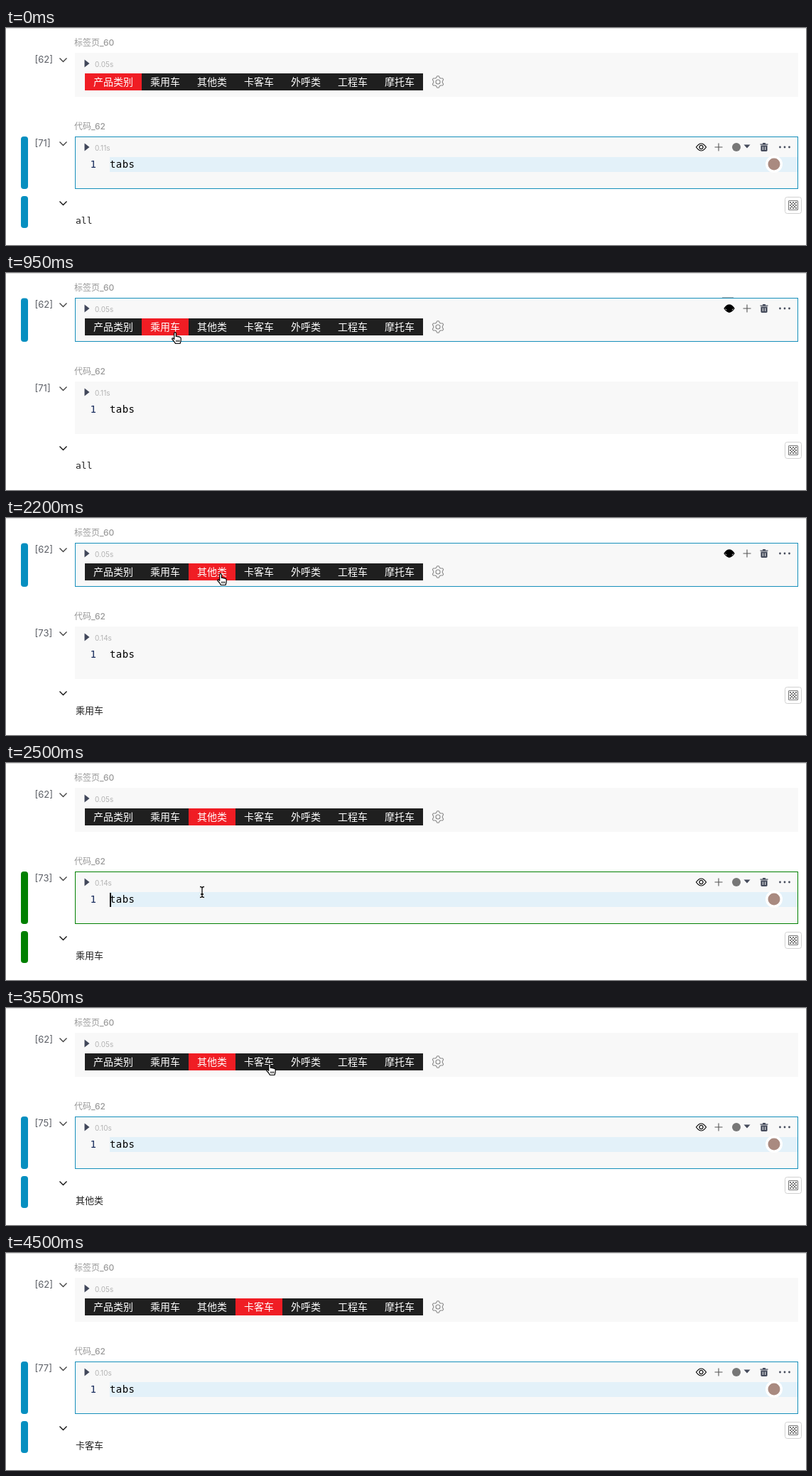
Animation, 1126 px wide and 306 px high, one loop 4980 ms. Source, as an HTML page:

```html
<!DOCTYPE html>
<html lang="zh-CN">
<head>
<meta charset="utf-8">
<title>Notebook tabs</title>
<style>
html, body { margin: 0; width: 100%; height: 100%; overflow: hidden; background: #fff; }
svg { display: block; width: 1126px; height: 306px; }
text { font-family: Inter, "Noto Sans CJK SC", "Noto Sans CJK", sans-serif; white-space: pre; }
.label { font-size: 12px; font-weight: 500; fill: #999; }
.count { font-size: 13px; fill: #5c5f66; }
.time { font-size: 10px; fill: #b3b3b3; }
.tab { font-size: 14px; fill: #fff; text-anchor: middle; font-family: "Noto Sans CJK SC", "Noto Sans CJK", sans-serif; }
.code { font: 14px "DejaVu Sans Mono", monospace; letter-spacing: .4px; fill: #000; }
.out { font-size: 13px; fill: #222; font-family: "DejaVu Sans Mono", "Noto Sans CJK SC", "Noto Sans CJK", monospace; }
.line { fill: none; stroke: #555; stroke-width: 1.1; }
</style>
</head>
<body>
<svg viewBox="0 0 1126 306" xmlns="http://www.w3.org/2000/svg">
  <defs>
    <path id="chevron" d="M-5 -2.5L0 2.5L5 -2.5" fill="none" stroke-width="1.4"/>
    <path id="play" d="M0 -5.5L7 0L0 5.5Z" fill="#41475a"/>
    <g id="plus"><path class="line" d="M-5.5 0H5.5M0 -5.5V5.5"/></g>
    <g id="trash">
      <path d="M-5.5 -4.6H5.5V-3.2H-5.5ZM-2 -6H2V-4.5H-2ZM-4.6 -2.6H4.6V4.6Q4.6 6 3.2 6H-3.2Q-4.6 6 -4.6 4.6Z" fill="#454b5b"/>
      <path d="M-1.6 -.6V4M1.6 -.6V4" stroke="#f8f8f8"/>
    </g>
    <g id="dots" fill="#454b5b"><circle cx="-6.5" r="1.4"/><circle r="1.4"/><circle cx="6.5" r="1.4"/></g>
    <path id="lens" d="M-7 0Q0 -10 7 0Q0 10 -7 0Z"/>
  </defs>
  <rect width="1126" height="306" fill="#fff"/>
  <path d="M0 .5H1126" stroke="#dedede"/>

  <text class="label" x="96" y="25">标签页_60</text>
  <text class="count" x="40.5" y="49">[62]</text>
  <use href="#chevron" x="80.5" y="45" stroke="#444"/>
  <rect x="97" y="35" width="1018" height="62" fill="#f8f8f8"/>
  <use href="#play" x="110.5" y="50"/>
  <text class="time" x="125" y="55">0.05s</text>
  <rect x="111" y="64" width="476" height="24" fill="#1f1f1f"/>
  <rect id="active" y="64" height="24" fill="#f01d24"/>
  <g id="tabs"></g>
  <path id="gear" class="line" stroke-linejoin="round"/>
  <circle class="line" cx="608" cy="76" r="3"/>

  <text class="label" x="96" y="143">代码_62</text>
  <text class="count" id="count" x="40.5" y="167"></text>
  <use href="#chevron" x="80.5" y="163" stroke="#444"/>
  <rect x="97" y="153" width="1018" height="74" fill="#f8f8f8"/>
  <g id="idle">
    <use href="#play" x="110.5" y="168"/>
    <text class="time" id="time" x="125" y="173"></text>
  </g>
  <g id="busy">
    <rect x="113" y="163" width="10" height="10" fill="#41475a"/>
    <g id="spin" stroke-width="1.3" stroke-linecap="round"></g>
    <text class="label" x="96" y="308">单选框_61</text>
  </g>

  <g id="focus1">
    <rect x="21" y="35.5" width="10" height="61.5" rx="4" fill="#068fc0"/>
    <rect x="97.5" y="35.5" width="1017" height="61" fill="none" stroke="#168fbb"/>
    <g transform="translate(1018 50)">
      <use href="#lens" fill="#fff" stroke="#000" stroke-width="1.3"/>
      <path d="M-7 -.5Q0 -9 7 -.5L4 1.5A4 4 0 0 1 -4 1.5Z"/>
    </g>
    <use href="#plus" x="1043" y="50"/>
    <use href="#trash" x="1067" y="50"/>
    <use href="#dots" x="1096" y="50"/>
    <path id="hint" d="M1008 34.5H1024" stroke="#aaa"/>
  </g>

  <g id="focus2">
    <rect x="146" y="182" width="968" height="21" fill="#e3f1f9"/>
    <rect id="bar" x="21" y="153" width="10" height="74" rx="4"/>
    <rect id="outBar" x="21" y="237" width="10" rx="4"/>
    <rect id="frame" x="97.5" y="153.5" width="1017" height="73" fill="none"/>
    <g transform="translate(978.5 168)">
      <use href="#lens" fill="#fff" stroke="#000" stroke-width="1.2"/>
      <circle r="2.6" fill="none" stroke="#000" stroke-width="1.2"/>
    </g>
    <use href="#plus" x="1003" y="168"/>
    <circle cx="1028" cy="168" r="6" fill="#777"/>
    <path d="M1038.5 164.500H1047.500L1043 169.500Z" fill="#454b5b"/>
    <use href="#trash" x="1067" y="168"/>
    <use href="#dots" x="1096" y="168"/>
    <circle cx="1081" cy="192" r="12" fill="#fff"/>
    <circle cx="1081" cy="192" r="8.5" fill="#a98a80"/>
  </g>
  <text class="code" x="118.5" y="197" style="fill:#14285a">1</text>
  <text class="code" x="146" y="197">tabs</text>
  <rect id="caret" y="183" width="2" height="20" fill="#000"/>

  <use href="#chevron" x="80.5" y="247" stroke="#111"/>
  <text class="out" id="out" x="98" y="276"></text>
  <rect x="1096.500" y="238.500" width="23" height="23" rx="3" fill="#fff" stroke="#d0d0d0"/>
  <rect class="line" x="1101.500" y="243.500" width="13" height="13" rx="1" stroke-opacity=".8"/>
  <g id="weave" fill="#777"></g>

  <g id="hand">
    <path d="M-3.300 2.500V-5.600Q-3.300 -7.300 -2 -7.300Q-.6 -7.300 -.6 -5.600V-1.500Q.8 -2.500 1.800 -1.100Q3.300 -2 4.100 -.5Q6.200 -.8 6.200 1.500V4Q6 6 5 8.500H-1.500Q-3 5.500 -5.500 3.300Q-7 1.500 -5.500 .9Q-4.300 .7 -3.300 2.500Z" fill="#fff" stroke="#000" stroke-width="1.2" stroke-linejoin="round"/>
    <path d="M-.2 3.500V6.300M1.800 3.500V6.300M3.800 3.500V6.300" stroke="#000"/>
  </g>
  <g id="beam" fill="none">
    <path d="M-3 -7.500Q0 -7.500 0 -5.500Q0 -7.500 3 -7.500M0 -6V6M-3 7.500Q0 7.500 0 5.500Q0 7.500 3 7.500M-2 3H2" stroke="#fff" stroke-width="3"/>
    <path d="M-3 -7.500Q0 -7.500 0 -5.500Q0 -7.500 3 -7.500M0 -6V6M-3 7.500Q0 7.500 0 5.500Q0 7.500 3 7.500M-2 3H2" stroke="#000" stroke-width="1.3"/>
  </g>
  <path id="arrow" d="M0 0V14.500L3.300 11.500L5.600 16.800L8 15.800L5.800 10.600H10.500Z" stroke="#fff"/>
</svg>
<script>
const LOOP = 4980, STEP = 50;
const NAMES = ["产品类别", "乘用车", "其他类", "卡客车", "外呼类", "工程车", "摩托车"];
const BLUE = "#068fc0", GREEN = "#008000";
const $ = id => document.getElementById(id);
const set = (el, attrs) => { for (const k in attrs) el.setAttribute(k, attrs[k]); return el; };
const add = (parent, tag, attrs) =>
  parent.appendChild(set(document.createElementNS("http://www.w3.org/2000/svg", tag), attrs));
const show = (id, on) => set($(id), { visibility: on ? "visible" : "hidden" });
const tabX = i => i ? 125 + 66 * i : 111;
const tabW = i => i ? 66 : 80;

// Latest entry whose start time has passed
const at = (list, t) => list.reduce((v, e) => t >= e[0] ? e[1] : v, list[0][1]);

const focus = [[0, "run"], [650, "tabs"], [1450, "edit"], [1650, "run"], [2200, "tabs"],
  [2500, "edit"], [2950, "run"], [3600, "tabs"], [3900, "edit"], [4100, "run"]];
const picked = [[0, 0], [650, 1], [2200, 2], [3600, 3]];
const results = [[0, ["[71]", "0.11s", "all"]], [1700, ["[73]", "0.14s", NAMES[1]]],
  [2950, ["[75]", "0.10s", NAMES[2]]], [4150, ["[77]", "0.10s", NAMES[3]]]];
const path = [[50, 1071, 1], [550, 240, 91], [1150, 240, 91], [1400, 202, 196], [1750, 202, 196],
  [2150, 304, 86], [2250, 304, 86], [2450, 276, 182], [3050, 276, 182], [3550, 373, 86],
  [3600, 373, 86], [3750, 622, 197], [4350, 622, 197], [4450, 297, 277], [4500, 297, 277]];

NAMES.forEach((name, i) => {
  add($("tabs"), "text", { class: "tab", x: tabX(i) + tabW(i) / 2, y: 81 }).textContent = name;
});

// Six-toothed gear outline
let gear = "";
for (let i = 0; i < 24; i++) {
  const a = (i - .5) * Math.PI / 12, r = i % 4 < 2 ? 8.3 : 6.3;
  gear += (i ? "L" : "M") + (608 + r * Math.sin(a)).toFixed(2) + " " + (76 - r * Math.cos(a)).toFixed(2);
}
set($("gear"), { d: gear + "Z" });
document.querySelectorAll("#gear, #gear + circle").forEach(e => e.style.stroke = "#888");

for (let i = 0; i < 25; i++) {
  const c = i % 5, r = Math.floor(i / 5);
  if ((c + r) % 2 === 0) add($("weave"), "rect", { x: 1103 + 2 * c, y: 245 + 2 * r, width: 2, height: 2 });
}
for (let i = 0; i < 8; i++)
  add($("spin"), "path", { d: "M0 -3V-5.500", transform: `translate(145 168) rotate(${i * 45})` });

function pointer(t) {
  if (t < 50 || t >= 4500) return null;
  const i = path.findIndex(p => p[0] > t);
  const [t0, x0, y0] = path[i - 1], [t1, x1, y1] = path[i];
  const k = (t - t0) / (t1 - t0), e = k * k * (3 - 2 * k);
  return [x0 + (x1 - x0) * e, y0 + (y1 - y0) * e];
}

function draw(t) {
  const mode = at(focus, t), tab = at(picked, t), [count, time, out] = at(results, t);
  const busy = t >= 1650 && t < 1700 || t >= 4100 && t < 4150;
  const color = mode === "edit" ? GREEN : BLUE;

  set($("active"), { x: tabX(tab), width: tabW(tab) });
  show("focus1", mode === "tabs");
  $("hint").style.display = t >= 950 && t < 1050 ? "" : "none";
  show("focus2", mode !== "tabs");
  set($("bar"), { fill: color });
  set($("outBar"), { fill: color, height: busy ? 26 : 45 });
  set($("frame"), { stroke: mode === "edit" ? GREEN : "#168fbb" });

  $("count").textContent = count;
  $("time").textContent = time;
  $("out").textContent = out;
  show("idle", !busy);
  show("busy", busy);
  show("out", !busy);
  [...$("spin").children].forEach((s, i) =>
    set(s, { stroke: "#999", "stroke-opacity": .35 + .5 * ((i + t / STEP) % 8) / 8 }));
  show("caret", mode === "edit");
  set($("caret"), { x: t >= 2500 && t < 2600 ? 146 : 181 });

  const p = pointer(t);
  let kind = "";
  if (p) {
    const [x, y] = p;
    kind = x > 111 && x < 587 && y > 62 && y < 97 ? "hand"
      : x > 146 && x < 1060 && y > 180 && y < 226 ? "beam" : "arrow";
    set($(kind), { transform: `translate(${x.toFixed(1)} ${y.toFixed(1)})` });
  }
  for (const id of ["hand", "beam", "arrow"]) show(id, id === kind);
}

const start = performance.now();
function tick(now) {
  const t = Math.max(0, now - start) % LOOP;
  draw(Math.floor(t / STEP) * STEP);
  requestAnimationFrame(tick);
}
draw(0);
requestAnimationFrame(tick);
</script>
</body>
</html>
```
